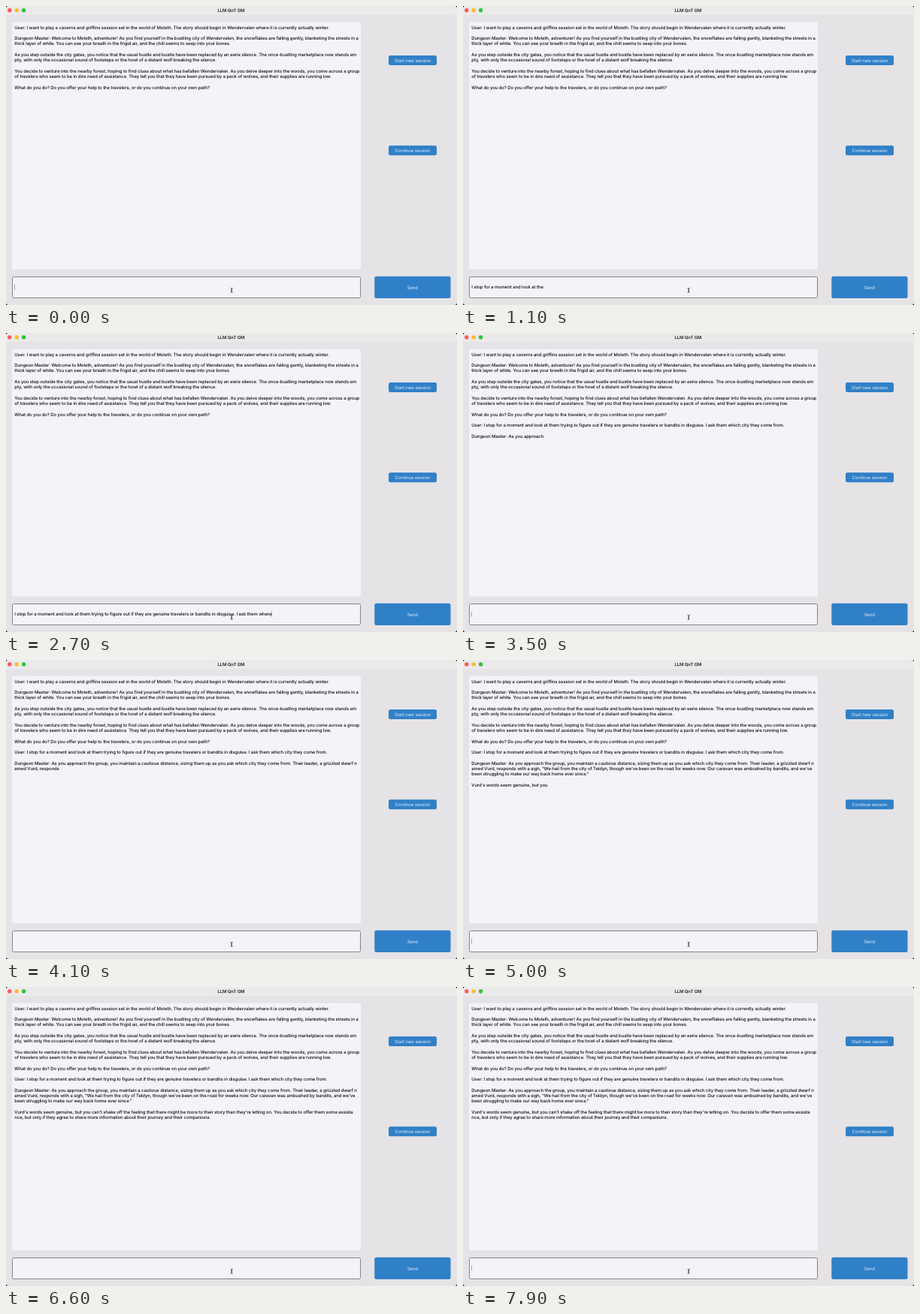
Write an HTML page that moves like this. It is 600 by 399 pixels and loops after 8000 ms.

```html
<!DOCTYPE html>
<html lang="en">
<head>
<meta charset="utf-8">
<title>LLM QnT GM</title>
<style>
  html, body { margin: 0; width: 100%; height: 100%; overflow: hidden; }
  svg { display: block; width: 600px; height: 399px; background: #000; }
  text { font: 500 5.95px Inter, sans-serif; letter-spacing: -.08px; fill: #0c0c0e;
         white-space: pre; text-rendering: geometricPrecision; }
  .label { text-anchor: middle; font-weight: 400; fill: #e4eefa; }
  .title { text-anchor: middle; font-weight: 700; fill: #3b393b; }
  .button { fill: #3080c8; }
</style>
</head>
<body>
<svg viewBox="0 0 600 399">
  <rect width="600" height="399" rx="3.5" fill="#e5e3e5"/>
  <path d="M0 12V3.5Q0 0 3.5 0H596.5Q600 0 600 3.5V12Z" fill="#ebeaeb"/>
  <circle cx="4.8" cy="5.7" r="2.7" fill="#fc5b54"/>
  <circle cx="14.2" cy="5.7" r="2.7" fill="#fdbb2f"/>
  <circle cx="23.6" cy="5.7" r="2.7" fill="#2ac43f"/>
  <text class="title" x="299.5" y="7.8">LLM QnT GM</text>

  <rect x="8" y="21.5" width="464" height="330" rx="2.5" fill="#f4f3f7"/>
  <g id="log"></g>

  <rect x="8.5" y="361.5" width="463" height="28" rx="2" fill="#f4f3f7" stroke="#858488"/>
  <text id="input" x="11.3" y="377.3"></text>
  <rect id="caret" y="371.7" width=".7" height="7" fill="#858488"/>
  <path d="M298.7 376.4q1.5 0 1.5 1v4q0 1-1.5 1M301.7 376.4q-1.5 0-1.5 1v4q0 1 1.5 1"
        fill="none" stroke="#222" stroke-width=".7"/>

  <rect class="button" x="509" y="66" width="64" height="13" rx="2.5"/>
  <text class="label" x="541" y="74.6">Start new session</text>
  <rect class="button" x="509" y="186.3" width="64" height="13" rx="2.5"/>
  <text class="label" x="541" y="194.9">Continue session</text>
  <rect class="button" x="490.3" y="360.7" width="101.2" height="29.2" rx="2.5"/>
  <text class="label" x="540.7" y="377.6">Send</text>
</svg>
<script>
const LOOP = 8000, SEND = 3330, STREAM = 3399, CHARS_PER_MS = 0.2567, BLINK = 550;

const story = `User: I want to play a caverns and griffins session set in the world of Moleth. The story should begin in Wendervalen where it is currently actually winter.

Dungeon Master: Welcome to Moleth, adventurer! As you find yourself in the bustling city of Wendervalen, the snowflakes are falling gently, blanketing the streets in a
thick layer of white. You can see your breath in the frigid air, and the chill seems to seep into your bones.

As you step outside the city gates, you notice that the usual hustle and bustle have been replaced by an eerie silence. The once-bustling marketplace now stands em
pty, with only the occasional sound of footsteps or the howl of a distant wolf breaking the silence.

You decide to venture into the nearby forest, hoping to find clues about what has befallen Wendervalen. As you delve deeper into the woods, you come across a group
of travelers who seem to be in dire need of assistance. They tell you that they have been pursued by a pack of wolves, and their supplies are running low.

What do you do? Do you offer your help to the travelers, or do you continue on your own path?`;

const draft = 'I stop for a moment and look at them trying to figure out if they are genuine travelers or bandits in disguise. I ask them where';
const message = draft.replace(/ere$/, 'ich city they come from.');

const reply = `Dungeon Master: As you approach the group, you maintain a cautious distance, sizing them up as you ask which city they come from. Their leader, a grizzled dwarf n
amed Vurd, responds with a sigh, "We hail from the city of Teldyn, though we've been on the road for weeks now. Our caravan was ambushed by bandits, and we've
been struggling to make our way back home ever since."

Vurd's words seem genuine, but you can't shake off the feeling that there might be more to their story than they're letting on. You decide to offer them some assista
nce, but only if they agree to share more information about their journey and their companions.`;

// [time, typed characters]; the dip is the backspacing of the last word
const typing = [[0, 0], [400, 0], [900, 25], [1100, 35.5], [1800, 77], [2650, 128], [2720, 128],
                [2850, 125], [3270, 149], [LOOP, 149]];

const [log, input, caret] = ['log', 'input', 'caret'].map(id => document.getElementById(id));
const rows = Array.from({ length: 21 }, (_, i) => {
  const row = document.createElementNS('http://www.w3.org/2000/svg', 'text');
  row.setAttribute('x', 11.3);
  row.setAttribute('y', 30.6 + 7.28 * i);
  return log.appendChild(row);
});

function typedCount(t) {
  const i = typing.findIndex(([time]) => time > t);
  const [t0, n0] = typing[i - 1], [t1, n1] = typing[i];
  return Math.floor(n0 + (n1 - n0) * (t - t0) / (t1 - t0));
}

// The reply arrives in whole words
function streamed(t) {
  if (t < STREAM) return '';
  const n = Math.floor((t - STREAM) * CHARS_PER_MS);
  return reply.slice(0, n + reply.slice(n).search(/\s|$/));
}

function draw(t) {
  const sent = t >= SEND;
  const lines = (sent ? `${story}\n\nUser: ${message}\n\n${streamed(t)}` : story).split('\n');
  rows.forEach((row, i) => row.textContent = lines[i] || '');

  input.textContent = sent ? '' : (t < 2850 ? draft : message).slice(0, typedCount(t));
  caret.setAttribute('x', 11 + input.getComputedTextLength());
  const blinkOn = Math.floor((t - 3495) / BLINK) % 2 === 0;
  caret.style.visibility = t < 400 || blinkOn ? 'visible' : 'hidden';
}

function tick(now) {
  draw(now % LOOP);
  requestAnimationFrame(tick);
}
draw(0);
requestAnimationFrame(tick);
</script>
</body>
</html>
```
